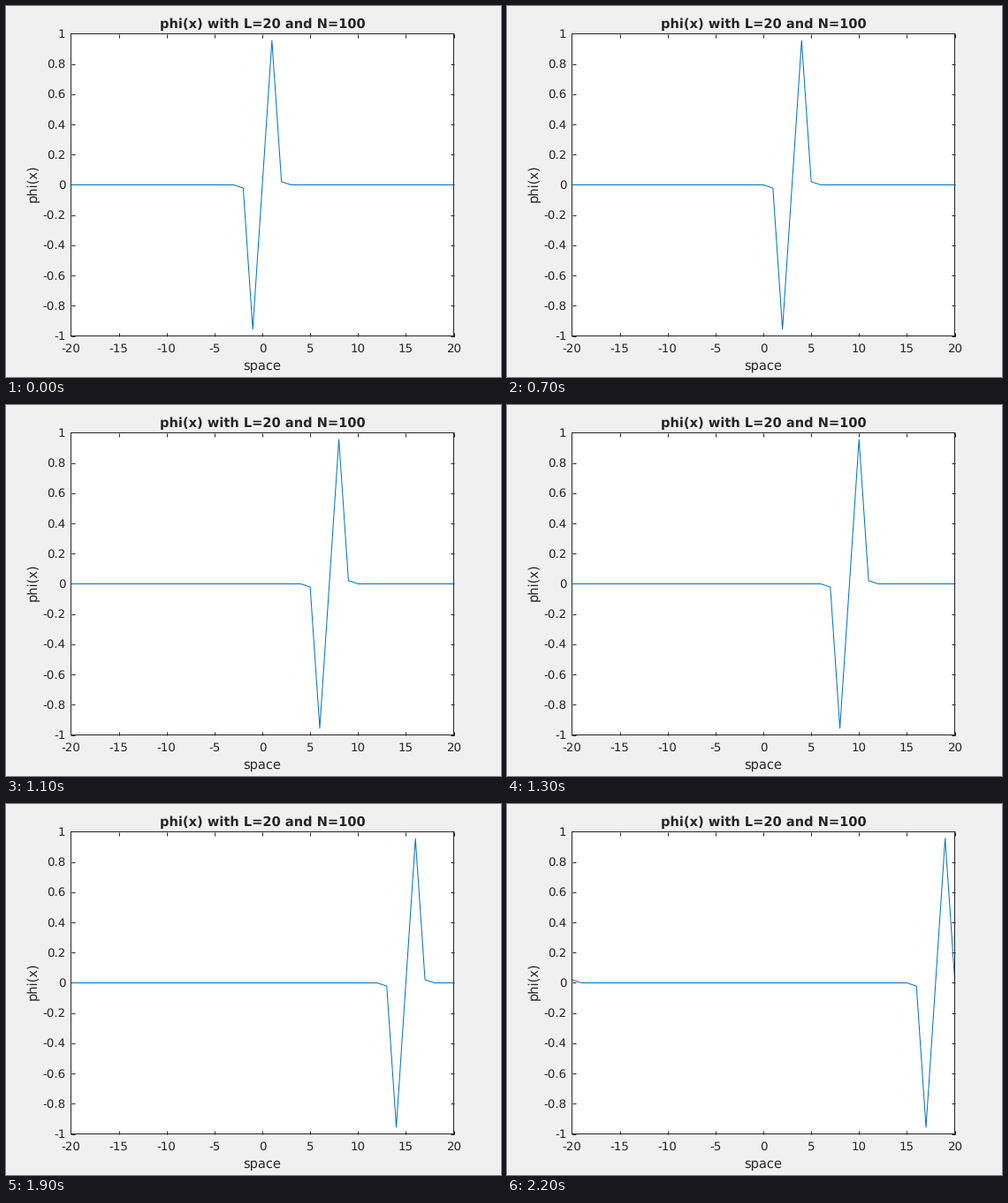
Recreate the animation shown at these times as a matplotlib script. Size 560 by 420 pixels, loop 2300 ms.

```python
import numpy as np
import matplotlib.pyplot as plt
from matplotlib.animation import FuncAnimation

W, H, DPI = 560, 420, 80
PX = 72 / DPI  # points per pixel
LEFT, RIGHT, TOP, BOTTOM = 73.5, 506.5, 31.5, 373.5
INK = (0.15, 0.15, 0.15)
L = 20
HOLD = 4  # steps the pulse rests before it moves

plt.rcParams.update({"font.family": "DejaVu Sans", "text.hinting": "none"})
fig = plt.figure(figsize=(W / DPI, H / DPI), dpi=DPI, facecolor="#f0f0f0")
ax = fig.add_axes([LEFT / W, 1 - BOTTOM / H,
                   (RIGHT - LEFT) / W, (BOTTOM - TOP) / H])
ax.set(xlim=(-L, L), ylim=(-1, 1))


def label(x, y, text, size, ha="center", **kw):
    """Place text with its baseline at pixel (x, y) from the top left."""
    fig.text(x / W, 1 - y / H, text, fontsize=size * PX, color=INK,
             ha=ha, va="baseline", **kw)


xticks = np.arange(-L, L + 1, 5)
yticks = np.arange(-5, 6) / 5
ax.set_xticks(xticks)
ax.set_yticks(yticks)
ax.tick_params(direction="in", top=True, right=True, length=4.3 * PX,
               width=PX, color=INK, labelbottom=False, labelleft=False)
for spine in ax.spines.values():
    spine.set(linewidth=PX, edgecolor=INK, snap=False)

for v in xticks:
    label(LEFT + (v + L) / (2 * L) * (RIGHT - LEFT), 392, f"{v}", 13.33)
for v in yticks:
    y = BOTTOM - (v + 1) / 2 * (BOTTOM - TOP)
    label(67.4, y + 4.4, f"{v:g}", 13.33, ha="right")

label(290, 25, "phi(x) with L=20 and N=100", 14.67, weight="bold")
label(290, 412, "space", 14.67)
label(34.4, 201, "phi(x)", 14.67, rotation=90, rotation_mode="anchor")

x = np.arange(-L, L + 1)
line, = ax.plot(x, 0 * x, color="#0072bd", linewidth=PX)


def phi(shift):
    d = (x - shift + L) % (2 * L) - L  # periodic domain
    return 0.956 * d * np.exp(1.5 * (1 - d**2.0))


def update(i):
    line.set_ydata(phi(max(0, i - HOLD)))
    return line,


anim = FuncAnimation(fig, update, frames=23, interval=100, repeat=True,
                     repeat_delay=0, blit=False)
plt.show()
```
